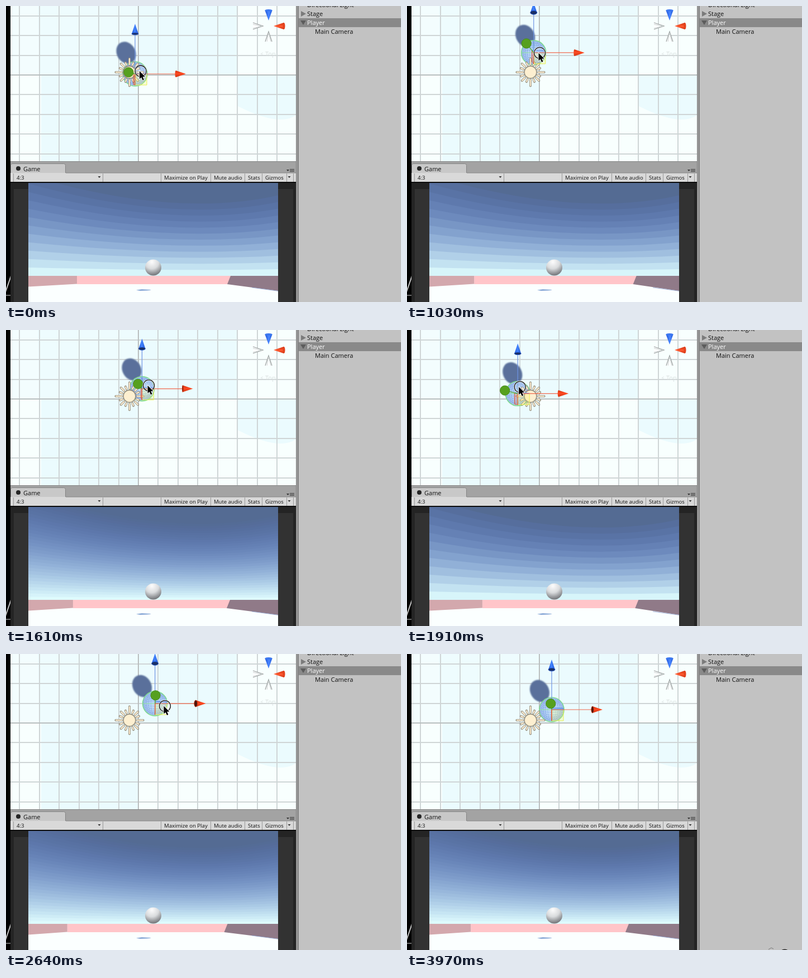
Write an HTML page with a canvas that moves like this. It is 707 px wide and 532 px high and loops after 4020 ms.

```html
<!DOCTYPE html>
<html lang="en">
<head>
<meta charset="utf-8">
<title>Scene and game view</title>
<style>
  html, body { margin: 0; width: 100%; height: 100%; overflow: hidden; background: #000; }
  canvas { display: block; width: 707px; height: 532px; }
</style>
</head>
<body>
<canvas id="stage" width="707" height="532"></canvas>
<script>
const g = document.getElementById('stage').getContext('2d');
const LOOP = 4020;
const STEP = 146.6;
const TAU = Math.PI * 2;

// Turning points of the drag: ball position and pointer offset
const turns = [
  { at: 430, x: 231, y: 122, px: 10, py: 1 },
  { at: 730, x: 205.5, y: 125, px: 1.5, py: 1 },
  { at: 1320, x: 270, y: 69, px: 20, py: 0 },
  { at: 1910, x: 198, y: 114, px: 4, py: -12 },
  { at: 2350, x: 260, y: 58, px: 20, py: -4 },
  { at: 2790, x: 259, y: 100, px: 17, py: 7.5 }
];

const mix = (a, b, k) => a + (b - a) * k;
const clamp = (v, lo, hi) => Math.min(hi, Math.max(lo, v));

// The screen refreshes in even steps; each drag stroke eases along a clockwise arc.
function poseAt(time) {
  const held = Math.floor((time + 10) / STEP) * STEP;
  const i = clamp(turns.findIndex(p => p.at > held), 0, turns.length);
  const b = held > 2780 ? turns.at(-1) : turns[i];
  const a = turns[Math.max(0, turns.indexOf(b) - 1)];
  const k = clamp((held - a.at) / (b.at - a.at || 1), 0, 1);
  const ease = (1 - Math.cos(Math.PI * k)) / 2;
  const bow = .2 * Math.sin(Math.PI * k);
  const x = mix(a.x, b.x, ease) + (b.y - a.y) * bow;
  const y = mix(a.y, b.y, ease) - (b.x - a.x) * bow;
  const press = held < STEP ? -6 : 0;
  return { x, y, px: x + mix(a.px, b.px, ease), py: y + mix(a.py, b.py, ease) + press };
}

function rect(x, y, w, h, color) {
  g.fillStyle = color;
  g.fillRect(x, y, w, h);
}

function poly(color, ...xy) {
  g.beginPath();
  for (let i = 0; i < xy.length; i += 2) g.lineTo(xy[i], xy[i + 1]);
  g.closePath();
  g.fillStyle = color;
  g.fill();
}

function line(color, width, ...xy) {
  g.beginPath();
  for (let i = 0; i < xy.length; i += 2) g.lineTo(xy[i], xy[i + 1]);
  g.strokeStyle = color;
  g.lineWidth = width;
  g.stroke();
}

function oval(x, y, rx, ry, fill, stroke, width = 1, turn = 0) {
  g.beginPath();
  g.ellipse(x, y, rx, ry, turn, 0, TAU);
  if (fill) { g.fillStyle = fill; g.fill(); }
  if (stroke) { g.strokeStyle = stroke; g.lineWidth = width; g.stroke(); }
}

function label(text, x, y, size = 11, color = '#111') {
  g.font = `${size}px "Open Sans", "Noto Sans", sans-serif`;
  g.fillStyle = color;
  g.fillText(text, x, y);
}

function clip(x, y, w, h, draw) {
  g.save();
  g.beginPath();
  g.rect(x, y, w, h);
  g.clip();
  draw();
  g.restore();
}

// Cone with its tip at x, y, pointing along the angle
function cone(x, y, angle, length, half, light, dark, base = 0, baseColor = '#222') {
  g.save();
  g.translate(x, y);
  g.rotate(angle);
  const fill = g.createLinearGradient(0, -half, 0, half);
  fill.addColorStop(0, dark);
  fill.addColorStop(.45, light);
  fill.addColorStop(1, dark);
  poly(fill, 0, 0, -length, -half, -length, half);
  oval(-length, 0, 1.5, half, fill);
  if (base > 0) oval(-length, 0, base, half, baseColor, dark, .8);
  g.restore();
}

function paleCone(x, y, angle) {
  g.save();
  g.translate(x, y);
  g.rotate(angle);
  poly('#fdffff', 0, 0, -18, -6, -18, 6);
  line('#9ca1a1', 1.2, -18, -6, 0, 0, -18, 6);
  line('#c9cece', 1, -18, -3, -2, 0, -18, 4);
  g.restore();
}

function pointer(x, y) {
  g.save();
  g.translate(x, y);
  g.beginPath();
  for (const [px, py] of [[0, 0], [0, 14], [3.2, 11.2], [5.6, 16.5], [8, 15.4], [5.7, 10.3], [10, 10]]) g.lineTo(px, py);
  g.closePath();
  g.strokeStyle = '#fff';
  g.lineWidth = 1.6;
  g.stroke();
  g.fillStyle = '#000';
  g.fill();
  g.restore();
}

function drawGround() {
  const tint = '#ebfbfe';
  rect(8, 0, 511, 280, '#f8fffe');
  rect(8, 0, 229, 124, '#f3fdfe');
  poly('#eefcfe', 57, 0, 237, 0, 237, 124, 60, 124);
  rect(237, 0, 177, 124, tint);
  rect(63, 124, 174, 156, tint);
  g.beginPath();
  g.moveTo(415, 124);
  g.lineTo(519, 124);
  g.lineTo(519, 196);
  g.quadraticCurveTo(490, 218, 415, 180);
  g.fillStyle = tint;
  g.fill();
  for (let i = -6; i <= 7; i++) {
    const shift = Math.round(i * 35.45);
    rect(236 + shift, 0, 2, 280, '#cfd5d6');
    rect(8, 123 + shift, 511, 2, '#cfd5d6');
  }
  rect(236, 0, 1.5, 280, '#b3b7b7');
  rect(8, 123.3, 511, 1.5, '#b3b7b7');
}

function drawCompass() {
  cone(470, 26, Math.PI / 2, 18, 6.5, '#4a87ff', '#1f56d8');
  oval(470, 8, 6.5, 2, '#3c78f0');
  cone(479, 36, Math.PI, 18, 6, '#ff5a30', '#cf3211');
  oval(497.5, 36, 2, 6, '#e2421e');
  paleCone(460, 36, 0);
  paleCone(470, 46, -Math.PI / 2);
  label('Top', 464, 90, 11, '#d9dfdf');
  line('#e2e8e8', 1, 460, 84, 456, 86, 460, 88);
}

function drawBall(x, y) {
  const fill = g.createRadialGradient(x + 4, y + 5, 2, x, y, 22);
  fill.addColorStop(0, '#c6e4fb');
  fill.addColorStop(1, '#85aae6');
  oval(x, y, 22, 22, fill);
  g.setLineDash([1.5, 1.5]);
  for (let i = 1; i <= 6; i++) {
    const r = 21.5 * Math.sin(i * Math.PI / 14);
    oval(x, y, r, 21.5, null, '#ecf8ff', .9);
    oval(x, y, 21.5, r, null, '#6b91db', .8);
  }
  g.setLineDash([]);
  oval(x, y, 22, 22, null, '#7fdc91', 1.6);
  line('#8fe59a', 1, x - 22, y, x + 22, y);
  line('#8fe59a', 1, x, y - 22, x, y + 22);
}

function drawSun(x, y) {
  const rays = (color, width, extra) => {
    g.lineCap = 'round';
    for (let i = 0; i < 16; i++) {
      const a = i * TAU / 16;
      const reach = (i % 4 === 0 ? 24 : i % 2 ? 18 : 21) + extra;
      line(color, width, x + 14 * Math.cos(a), y + 14 * Math.sin(a),
        x + reach * Math.cos(a), y + reach * Math.sin(a));
    }
    g.lineCap = 'butt';
  };
  rays('#918b7b', 4, .5);
  rays('#f8e8cd', 2.4, 0);
  oval(x, y, 11, 11, '#fdefd0', '#8d8677', 1.4);
}

function drawHandles(x, y) {
  const gx = (x - 264) * .35, gy = (y - 130) * .36;
  const wx = gx * .25, wy = gy * .25;
  const plane = (ax, ay, bx, by, fill, stroke) => {
    const p = [x, y, x + ax, y + ay, x + ax + bx, y + ay + by, x + bx, y + by];
    poly(fill, ...p);
    line(stroke, 1, ...p, x, y);
  };
  plane(21, 0, 0, 20, 'rgba(245,245,90,.25)', '#e9f04f');
  plane(0, 20, wx, wy, 'rgba(240,80,50,.25)', '#e0573b');
  plane(21, 0, wx, wy, 'rgba(70,120,240,.25)', '#4c83e8');
  line('#6f94e4', 1.2, x, y, x, y - 72);
  line('#f0694d', 1.2, x, y, x + 72, y);
  cone(x, y - 90, -Math.PI / 2, 18, 6, '#4384ff', '#2257d2', (170 - y) * .04, '#1a2f66');
  cone(x + 91, y, 0, 18, 6, '#ff4a22', '#d03411', (x - 235) * .09, '#4a140a');
  line('#5fb52f', 1.4, x, y, x + gx, y + gy);
  oval(x + gx, y + gy, 8.6, 8.6, '#56a01f', '#478c18', 1);
}

function drawScene({ x, y, px, py }, time) {
  drawGround();
  g.save();
  g.filter = 'blur(0.8px)';
  oval(x - 16 - (x - 231) * .2, y - 38 + (122 - y) * .2, 16.7, 20.6, '#5a709b', null, 1, -.48);
  g.restore();
  drawBall(x, y);
  drawSun(221, 119);
  drawHandles(x, y);
  drawCompass();
  if (time < 2940) {
    oval(px, py, 10, 10, 'rgba(255,255,255,.15)', '#fff', 2.4);
    oval(px, py, 10, 10, null, '#111', 1.3);
    pointer(px - 2, py);
  }
}

// Blue rises almost evenly towards the horizon, red and green later
function skyColor(s) {
  const r = 84 + 142 * s ** 2;
  const b = 147 + 108 * s ** 1.1;
  return `rgb(${r}, ${107 + 148 * s ** 1.8}, ${b})`;
}

function drawSky(bands) {
  rect(40, 318, 447, 168, skyColor(0));
  for (let i = 1; i < bands; i++) {
    const s = i / bands;
    const y = 335 + 150 * s;
    const bend = 46 * (1 - s);
    g.beginPath();
    g.moveTo(40, y - bend);
    g.quadraticCurveTo(300, y + bend * .85, 487, y - bend * .15);
    g.lineTo(487, 486);
    g.lineTo(40, 486);
    g.fillStyle = skyColor((i + .5) / bands);
    g.fill();
  }
}

function drawGame({ x, y }) {
  drawSky(x < 240 ? 13 : 34);
  const dx = x - 231, dy = y - 122;
  const left = 127 - .29 * dx + .21 * dy;
  const right = 402 - .33 * dx - .19 * dy;
  rect(40, 485, 447, 47, '#fbffff');
  rect(left, 485, right - left, 15, '#ffc5c9');
  poly('#d3a8ad', 40, 485, left, 485, left, 499.5, 40, 504.5);
  poly('#907a88', right, 485, 487, 485, 487, 512, right - 6, 500);
  line('#8fa3d2', .8, 440, 506, 487, 512.3);
  poly('#8cabd8', 233, 510.5, 243, 509, 260, 510, 257, 511, 252, 511.5, 240, 512);
  const shine = g.createRadialGradient(261, 460, 1, 261, 460, 26);
  shine.addColorStop(0, '#fafafa');
  shine.addColorStop(.45, '#d9dbdd');
  shine.addColorStop(.8, '#8e9094');
  shine.addColorStop(1, '#6a6c70');
  oval(263.5, 470, 14.5, 14.5, shine);
}

function drawToolbar() {
  rect(8, 279, 512, 22, '#a3a3a3');
  rect(8, 279, 512, 1, '#858585');
  g.beginPath();
  g.roundRect(8.5, 283.5, 98, 20, [3, 3, 0, 0]);
  g.fillStyle = '#c8c8c8';
  g.fill();
  g.strokeStyle = '#858585';
  g.lineWidth = 1;
  g.stroke();
  oval(22, 292, 4, 4, '#262626');
  label('Game', 31, 297);
  poly('#333', 502, 294, 507, 294, 504.5, 297);
  for (let y = 293; y < 299; y += 2) rect(508, y, 8, 1, '#444');
  rect(8, 300, 512, 16, '#d9d9d9');
  rect(107, 299.5, 413, 1, '#858585');
  for (const x of [13, 173, 277, 366, 427, 458, 502, 514]) rect(x, 301, 1, 15, '#989898');
  label('4:3', 19, 312, 9.6);
  label('Maximize on Play', 283, 312, 9.6);
  label('Mute audio', 372, 312, 9.5);
  label('Stats', 433, 312, 9.5);
  label('Gizmos', 464, 312, 9.5);
  for (const x of [167, 507]) poly('#333', x - 2.5, 306, x + 2.5, 306, x, 309);
}

function drawTree() {
  rect(519, 0, 5, 532, '#a2a2a2');
  rect(519, 0, 1, 532, '#7f7f7f');
  rect(522, 0, 1.5, 532, '#777');
  rect(524, 0, 183, 532, '#c2c2c2');
  rect(524, 22, 183, 16, '#898989');
  label('Directional Light', 539, 2);
  label('Stage', 539, 18);
  label('Player', 539, 34, 11, '#fff');
  label('Main Camera', 553, 50);
  poly('#7b7b7b', 528, 9, 537, 14, 528, 19);
  poly('#5c5c5c', 527, 26, 537, 26, 532, 34);
}

function drawFrame() {
  rect(0, 0, 8, 532, '#000');
  clip(0, 480, 8, 52, () => {
    line('#c4c4c4', 2, 9, 485, -3, 520);
    line('#8e8e8e', 1.5, 0, 520, 8, 520);
  });
  rect(8, 316, 511, 216, '#242424');
  rect(8, 316, 511, 2, '#0c0c0c');
  rect(14, 329, 26, 203, '#323232');
  rect(487, 329, 27, 203, '#323232');
}

function drawStrays(time) {
  if (time >= 2940 && time < 3080) pointer(632, 103);
  if (time >= 3680 && time < 3830) {
    oval(656, 532, 8, 5, '#fff', '#222', 1.5);
  } else if (time >= 3830) {
    line('#777', 1, 647, 531, 652, 528, 656, 530);
  }
  if (time >= 3970) oval(676, 533, 5.5, 2.5, '#222');
}

function render(time) {
  const pose = poseAt(time);
  drawFrame();
  clip(8, 0, 511, 280, () => drawScene(pose, time));
  clip(40, 318, 447, 214, () => drawGame(pose));
  drawToolbar();
  drawTree();
  drawStrays(time);
}

const start = performance.now();
function tick() {
  render((performance.now() - start) % LOOP);
  requestAnimationFrame(tick);
}
tick();
</script>
</body>
</html>
```
